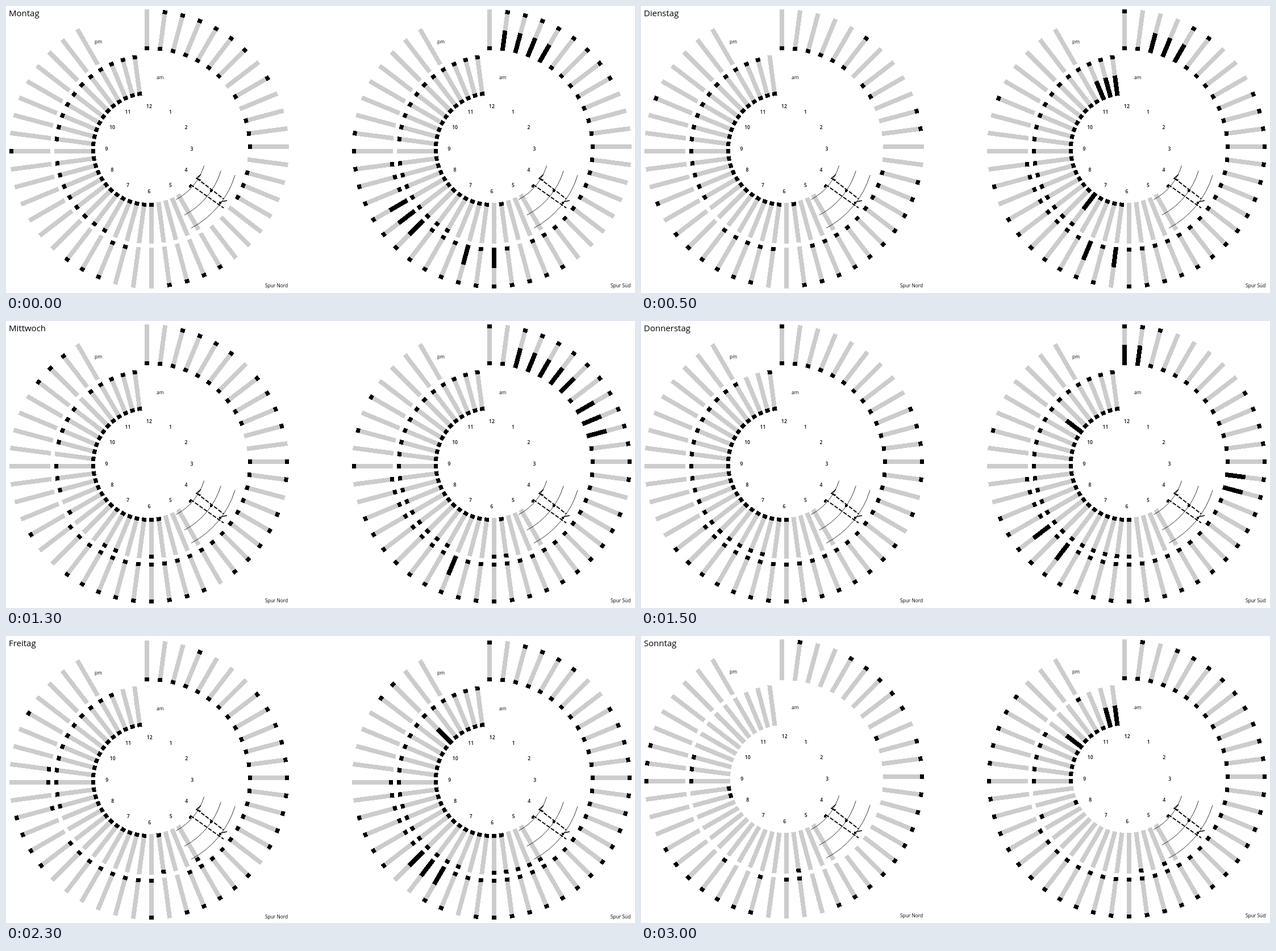
These frames come from a looping animation (1107x506 px, 3.5 s). An HTML page:

```html
<!DOCTYPE html>
<html lang="de">
<head>
<meta charset="utf-8">
<title>Wochenplan</title>
<style>
  html, body { margin: 0; width: 100%; height: 100%; overflow: hidden; background: #fff; }
  svg { display: block; width: 1107px; height: 506px; }
  text { font-family: "Open Sans", "Noto Sans", sans-serif; font-size: 8.4px; }
  .title { font-size: 15px; }
  .hour { font-size: 8.6px; font-weight: 600; text-anchor: middle; }
  .bars { fill: #ccc; }
  .bars, .marks { shape-rendering: crispEdges; }
  .sketch { fill: none; stroke: #000; }
</style>
</head>
<body>
<svg id="stage" viewBox="0 0 1107 506"></svg>
<script>
const STEP = 500;
const CENTERS = [252, 855], CENTER_Y = 252;
const OUTER = { from: 174, to: 246, first: 0, last: 44 };
const INNER = { from: 95, to: 167, first: 20, last: 47 };

// Quarter-hour slots, clockwise from the top. Per ring: tips, bases, half-length bases.
const DAYS = [
  { name: "Montag",
    nord: { outer: ["1-6 8 20-23 27-29 36", "0-6 8 10-12 14-16 26-27", ""],
            inner: ["28-35 37-47", "24-47", ""] },
    sued: { outer: ["1-8 20-37", "0-21 23 25 27-29 33-35", "1-4 24 26 30-32"],
            inner: ["28-35 37-47", "23 25-47", ""] } },
  { name: "Dienstag",
    nord: { outer: ["5 10-11 14-23 26-31 33 39", "0-5 7-8 14-22 25-29", ""],
            inner: ["32-46", "23 25-47", ""] },
    sued: { outer: ["0 4-5 9-24 26-32 34 39", "0-24 26 28-35", "2-4 25 27"],
            inner: ["29-47", "25-47", "29 45-47"] } },
  { name: "Mittwoch",
    nord: { outer: ["2-5 7-10 12-13 15-19 21-29 32 41-43", "0-9 12-31", ""],
            inner: ["24 27-28 32 34-36 38-41 43-47", "23-47", ""] },
    sued: { outer: ["0 2-13 15-33 36 38 40", "0-35", "2-6 8-10 27"],
            inner: ["23-24 28-47", "23 25-47", ""] } },
  { name: "Donnerstag",
    nord: { outer: ["0 9-13 15 17-31", "0-31", ""],
            inner: ["26-44 47", "24-47", ""] },
    sued: { outer: ["0-2 8-33 38", "0-35", "0-1 13-14 29 31"],
            inner: ["24-47", "24-47", "41"] } },
  { name: "Freitag", dx: .7, dy: 2,
    nord: { outer: ["3 7-16 18-22 24 31-34 40", "0-21 24-31 34 36-37", ""],
            inner: ["20 23 34-45", "23 25-47", ""] },
    sued: { outer: ["0 2-5 8-25 27-28 31-34 41-42", "0-36", "28-30"],
            inner: ["20-24 27-47", "23-47", "42"] } },
  { name: "Samstag", dx: .7, dy: 2,
    nord: { outer: ["0 2-6 8 10-21 25-28 30-33 39-40", "1 7 13-16 18-21 23-29 42", ""],
            inner: ["44-47", "31", ""] },
    sued: { outer: ["0-34 39 41", "0-31 34-35", "11-12"],
            inner: ["29-30 33-37 39 41 43-47", "22 33-47", "41"] } },
  { name: "Sonntag", dx: .7,
    nord: { outer: ["1 4-8 10-21 26-32 36-38", "9 23-24 26 29", ""],
            inner: ["23 36-38", "34-35", ""] },
    sued: { outer: ["1 3-41", "0-32", ""],
            inner: ["21 23 33 36-40 44", "33 36-47", "41 46-47"] } }
];

function add(parent, tag, attrs = {}, text = "") {
  const node = document.createElementNS("http://www.w3.org/2000/svg", tag);
  for (const key in attrs) node.setAttribute(key, attrs[key]);
  node.textContent = text;
  return parent.appendChild(node);
}

function slots(list) {
  return list.split(" ").filter(Boolean).flatMap(run => {
    const [a, b = a] = run.split("-").map(Number);
    return Array.from({ length: b - a + 1 }, (_, i) => a + i);
  });
}

function block(parent, slot, from, to) {
  add(parent, "rect", { x: -8, y: -to, width: 8, height: to - from, transform: `rotate(${slot * 7.5})` });
}

function drawBars(dial) {
  const group = add(dial, "g", { class: "bars" });
  for (const { first, last, from, to } of [OUTER, INNER])
    for (let slot = first; slot <= last; slot++) block(group, slot, from, to);
}

function drawMarks(dial, plan) {
  const group = add(dial, "g", { class: "marks" });
  const ring = ({ from, to }, [tips, bases, halves]) => {
    slots(tips).forEach(s => block(group, s, to - 7, to));
    slots(bases).forEach(s => block(group, s, from, from + 7));
    slots(halves).forEach(s => block(group, s, from, from + 36));
  };
  ring(OUTER, plan.outer);
  ring(INNER, plan.inner);
  return group;
}

function drawSketch(dial) {
  const group = add(dial, "g", { class: "sketch" });
  const polar = (r, deg) => {
    const a = deg * Math.PI / 180;
    return `${r * Math.cos(a)} ${r * Math.sin(a)}`;
  };
  for (const r of [101, 132, 158])
    add(group, "path", { d: `M${polar(r, 17)}A${r} ${r} 0 0 1 ${polar(r, 62)}`, "stroke-width": .8 });
  add(group, "path", { d: "M84 52L131 88M73 63L131 104", "stroke-width": 1.9, "stroke-dasharray": "7 2.5" });
  add(group, "path", { d: "M91 45L83 52L91 55M127 93L137 91M73 62L71 68", "stroke-width": 1.6 });
  add(group, "path", { d: "M70 66h4M107 74h4M123 95h4", "stroke-width": 4 });
}

function drawLabels(dial, track, trackX) {
  const group = add(dial, "g");
  for (let hour = 1; hour <= 12; hour++) {
    const a = hour * Math.PI / 6;
    add(group, "text", { class: "hour", x: 75 * Math.sin(a), y: 2.5 - 75 * Math.cos(a) }, hour);
  }
  add(dial, "text", { x: -96, y: -186 }, "pm");
  add(dial, "text", { x: 13, y: -123 }, "am");
  add(dial, "text", { x: trackX, y: 244 }, track);
  return group;
}

const stage = document.getElementById("stage");
const title = add(stage, "text", { class: "title", x: 5, y: 18 });

const dials = [["nord", "Spur Nord", 204], ["sued", "Spur Süd", 209]].map(([key, track, trackX], i) => {
  const root = add(stage, "g");
  drawBars(root);
  const marks = DAYS.map(day => drawMarks(root, day[key]));
  drawSketch(root);
  return { x: CENTERS[i], root, marks, labels: drawLabels(root, track, trackX) };
});

let shown = -1;
function show(index) {
  if (index === shown) return;
  shown = index;
  const { name, dx = 0, dy = 0 } = DAYS[index];
  title.textContent = name;
  for (const { x, root, marks, labels } of dials) {
    root.setAttribute("transform", `translate(${x} ${CENTER_Y + dy})`);
    labels.setAttribute("transform", `translate(${dx} 0)`);
    marks.forEach((group, i) => group.style.display = i === index ? "" : "none");
  }
}

const start = performance.now();
function tick() {
  show(Math.floor((performance.now() - start) / STEP) % DAYS.length);
  requestAnimationFrame(tick);
}
tick();
</script>
</body>
</html>
```
